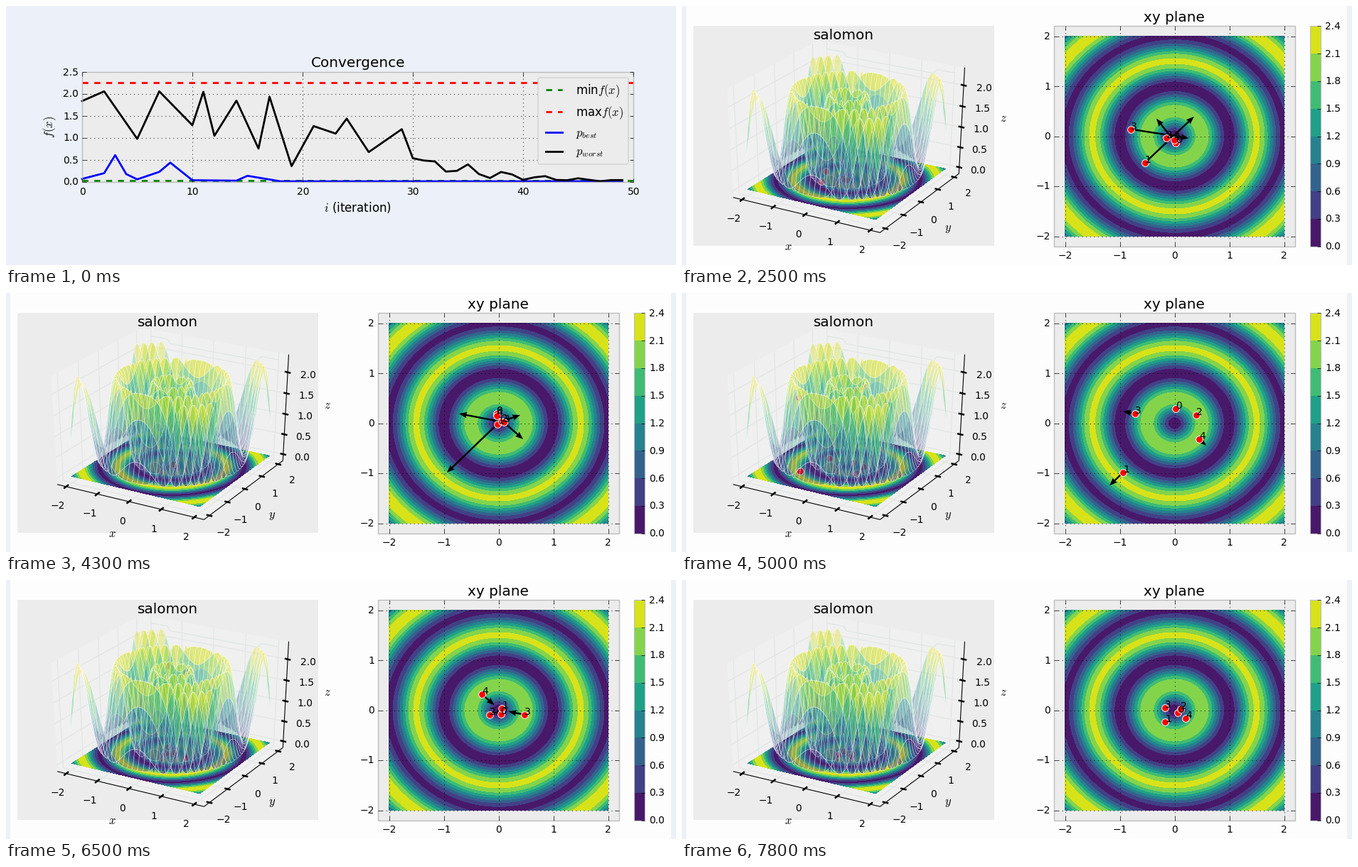
Write a matplotlib script that moves like this. It is 942 by 365 pixels and loops after 8 s.

```python
from itertools import product

import numpy as np
import matplotlib as mpl
import matplotlib.pyplot as plt
from matplotlib.animation import FuncAnimation
from matplotlib.collections import LineCollection, PolyCollection
from matplotlib.patches import FancyBboxPatch, Polygon, Rectangle

mpl.rcParams.update({"font.family": "DejaVu Sans", "mathtext.fontset": "cm"})

W, H, DPI = 942, 365, 100
PAPER, FACE, EDGE = "#ecf0f8", "#ececec", "#bcbcbc"
CMAP = mpl.colormaps["viridis"]
LEVELS = np.arange(9) * 0.3
TICKS = np.arange(-2, 3)

# Start of every swarm step, in tenths of a second
STARTS = np.array([5, 25, 30, 35, 39, 43, 47, 50, 54, 57, 61, 65, 68, 71, 75, 78])

# The swarm swings around the minimum: turning points of each particle (stage pixels)
TURNS = [0, 1, 5, 8, 11, 16]
SWINGS = np.array([
    [(705, 193), (699, 203), (685, 177), (694, 163), (695, 190), (697, 187)],
    [(607, 262), (582, 286), (762, 116), (620, 253), (705, 172), (679, 200)],
    [(709, 176), (688, 183), (670, 190), (723, 172), (671, 193), (701, 182)],
    [(557, 160), (550, 161), (762, 194), (637, 170), (751, 194), (679, 180)],
    [(718, 222), (716, 220), (652, 140), (727, 206), (652, 146), (708, 195)],
], dtype=float)


def swarm(step):
    j = min(int(np.searchsorted(TURNS, step, side="right")) - 1, len(TURNS) - 2)
    t = (step - TURNS[j]) / (TURNS[j + 1] - TURNS[j])
    ease = (1 - np.cos(np.pi * t)) / 2 if j == 3 else np.sin(np.pi * t / 2)
    return SWINGS[:, j] + ease * (SWINGS[:, j + 1] - SWINGS[:, j])


def height(x, y):
    r = np.hypot(x, y)
    return 1 - np.cos(2 * np.pi * r) + 0.1 * r


def through(i, points):
    return np.interp(i, *zip(*points))


def worst(i):
    """Zigzag between a few extremes, then a decaying ripple."""
    zigzag = through(i, [(0, 1.84), (2, 2.06), (5, 0.98), (7, 2.06), (10, 1.29), (11, 2.05),
                         (12, 1.05), (14, 1.85), (16, 0.76), (17, 1.94), (19, 0.36),
                         (21, 1.27), (23, 1.1), (24, 1.44), (26, 0.68), (29, 1.2)])
    j = np.maximum(i - 30, 0)
    ripple = 0.6 * np.minimum(j / 5, 1) * np.cos(2 * np.pi * (j - 5) / 3.4)
    return np.where(i < 30, zigzag, 0.54 * np.exp(-j / 6.5) * (1 + ripple))


def best(i):
    return through(i, [(0, 0.07), (2, 0.2), (3, 0.61), (4, 0.18), (5, 0.06), (7, 0.23),
                       (8, 0.44), (10, 0.04), (14, 0.03), (15, 0.14), (18, 0.015), (49, 0.015)])


# --- pixel canvas helpers -------------------------------------------------
fig = plt.figure(figsize=(W / DPI, H / DPI), dpi=DPI, facecolor=PAPER)


def canvas():
    ax = fig.add_axes([0, 0, 1, 1])
    ax.set_axis_off()
    ax.set_xlim(0, W)
    ax.set_ylim(H, 0)
    ax.set_autoscale_on(False)
    return ax


def box(ax, x0, y0, x1, y1, fc, ec="none", z=0.0, lw=1.0):
    ax.add_patch(Rectangle((x0, y0), x1 - x0, y1 - y0, fc=fc, ec=ec, lw=lw, zorder=z))


def write(ax, x, y, s, size=10, ha="center", va="baseline", zorder=8, **kw):
    return ax.text(x, y, s, size=size, ha=ha, va=va, zorder=zorder, **kw)


def segs(ax, lines, color="black", lw=0.5, z=5, **kw):
    ax.add_collection(LineCollection(lines, colors=color, linewidths=lw, zorder=z, **kw),
                      autolim=False)


def minus(t):
    return str(t).replace("-", "\u2212")


def frame(ax, x0, y0, x1, y1, xs, ys):
    """Spines, dotted grid and inward ticks on all four sides."""
    grid = [[(x, y1), (x, y0)] for x in xs] + [[(x0, y), (x1, y)] for y in ys]
    segs(ax, grid, z=3, linestyles=[(0, (2, 6))])
    box(ax, x0, y0, x1, y1, "none", EDGE, 4)
    t = 5.5
    marks = [[(x, a), (x, a + d)] for x in xs for a, d in ((y0, t), (y1, -t))]
    marks += [[(a, y), (a + d, y)] for y in ys for a, d in ((x0, t), (x1, -t))]
    segs(ax, marks)


# --- convergence chart ----------------------------------------------------
def build_chart(ax):
    x0, y0, x1, y1 = 107, 93, 882, 248
    px = lambda i: x0 + (x1 - x0) * np.asarray(i) / 50
    py = lambda v: y1 - (y1 - y0) * np.asarray(v) / 2.5
    box(ax, x0, y0, x1, y1, FACE)
    xs, ys = np.arange(0, 51, 10), np.arange(6) * 0.5
    frame(ax, x0, y0, x1, y1, px(xs), py(ys))
    for i in xs:
        write(ax, px(i) + 0.5, 266, str(i))
    for v in ys:
        write(ax, 102, py(v) + 4.5, f"{v:.1f}", ha="right")
    write(ax, 494.7, 86, "Convergence", 14.4)
    write(ax, 494.5, 289.5, "$i$ (iteration)", 12)
    write(ax, 62, 170.5, "$f(x)$", 12, rotation=90, va="center")

    dash = (0, (3, 3))
    ends, steps = np.array([0, 50]), np.arange(50)
    curves = [(ends, 0.03 + 0 * ends, "green", dash, "min$f(x)$", 118, 124.5),
              (ends, 2.26 + 0 * ends, "red", dash, "max$f(x)$", 149, 155),
              (steps, best(steps), "blue", "-", "$p_{best}$", 178, 184),
              (steps, worst(steps), "black", "-", "$p_{worst}$", 205, 210)]
    ax.add_patch(FancyBboxPatch((751, 104), 121, 116, boxstyle="round,pad=3", fc=FACE,
                                ec="#d2d2d2", lw=1, zorder=6))
    for n, (xs, ys, color, ls, label, ly, ty) in enumerate(curves):
        style = dict(color=color, lw=2, ls=ls, solid_capstyle="projecting")
        ax.plot(px(xs), py(ys), zorder=3.5 + n / 10, **style)
        ax.plot([758.5, 782], [ly, ly], zorder=7, **style)
        write(ax, 801, ty, label, 12, "left")


# --- 3D view --------------------------------------------------------------
ELEV, AZIM, DIST = np.radians(30), np.radians(-60), 10
MID, SPAN = np.array([0, 0, 1.125]), np.array([4.4, 4.4, 2.475])
L = 2.2 * 25 / 24
LO, HI = MID[2] + np.array([-1, 1]) * SPAN[2] / 2 * 25 / 24

ce, se, ca, sa = np.cos(ELEV), np.sin(ELEV), np.cos(AZIM), np.sin(AZIM)
CAMERA = np.array([(-sa, ca, 0), (-ca * se, -sa * se, ce), (ca * ce, sa * ce, se)])


def project(x, y, z):
    """Perspective view of the unit cube, in stage pixels."""
    p = np.stack(np.broadcast_arrays(x, y, z), -1)
    right, up, near = np.moveaxis((p - MID) / SPAN @ CAMERA.T, -1, 0)
    u, v = right / (DIST - near), up / (DIST - near)
    return 16 + 423 * (u + 0.095) / 0.185, 338.3 - 310 * (v + 0.095) / 0.185


def edge(*pts):
    return [project(*p) for p in pts]


def surface(ax, cells=25, sub=6):
    """Translucent patches with curved outlines, painted back to front."""
    g = np.linspace(-2, 2, cells * sub + 1)
    X, Y = np.meshgrid(g, g)
    Z = height(X, Y)
    P = np.stack([*project(X, Y, Z), Z, 0.5 * X - 0.87 * Y], -1)
    patches = []
    for r, c in product(range(0, cells * sub, sub), repeat=2):
        r1, c1 = r + sub, c + sub
        patches.append(np.concatenate([P[r, c:c1], P[r:r1, c1], P[r1, c1:c:-1], P[r1:r:-1, c]]))
    patches.sort(key=lambda q: q[:, 3].mean())
    colors = CMAP([q[:, 2].mean() / 2.1 for q in patches])
    colors[:, 3] = 0.34
    ax.add_collection(PolyCollection([q[:, :2] for q in patches], facecolors=colors, zorder=2,
                                     edgecolors=(1, 1, 1, 0.5), linewidths=0.45), autolim=False)


def build_view(ax):
    box(ax, 16, 28, 439, 338, FACE)
    walls = [[(-L, -L, LO), (-L, L, LO), (-L, L, HI), (-L, -L, HI)],
             [(-L, L, LO), (L, L, LO), (L, L, HI), (-L, L, HI)],
             [(-L, -L, LO), (L, -L, LO), (L, L, LO), (-L, L, LO)]]
    for wall in walls:
        ax.add_patch(Polygon(edge(*wall), fc="#f0f0f0", ec="none", zorder=0.3))
    zs = np.arange(5) * 0.5
    grid = [edge((t, -L, LO), (t, L, LO), (t, L, HI)) for t in TICKS]
    grid += [edge((L, t, LO), (-L, t, LO), (-L, t, HI)) for t in TICKS]
    grid += [edge((-L, -L, z), (-L, L, z), (L, L, z)) for z in zs]
    segs(ax, grid, "#e4e6e6", 1, 0.5)

    g = np.linspace(-2, 2, 161)
    X, Y = np.meshgrid(g, g)
    ax.contourf(*project(X, Y, 0), height(X, Y), LEVELS, cmap=CMAP, zorder=1)
    crest = height(X, Y).max(axis=0)
    segs(ax, [np.column_stack(project(g, L, crest))], "#dce5e3", 0.8, 0.6)
    surface(ax)

    segs(ax, [edge((-L, -L, LO), (L, -L, LO), (L, L, LO), (L, L, HI))], lw=0.8)
    along_x, along_y = np.array([4.2, 1.0]), np.array([3.4, -2.6])
    marks = [(project(t, -L, LO), along_y) for t in TICKS]
    marks += [(project(L, t, LO), along_x) for t in TICKS]
    marks += [(project(L, L, z), along_x) for z in zs]
    segs(ax, [[np.array(p) - d, np.array(p) + d] for p, d in marks], lw=1.8)
    for t in TICKS:
        write(ax, 163 + 45 * t, 326 + 10.75 * t, minus(t))
        write(ax, 354 + 24 * t, 305.5 - 18.5 * t, minus(t))
    for z in zs:
        write(ax, 416.5 + 4 * z, 235.5 - 57.5 * z, f"{z:.1f}")
    for x, y, s in ((149, 344, "$x$"), (374, 317, "$y$"), (452, 163, "$z$")):
        write(ax, x, y, s, 12)
    write(ax, 227, 47, "salomon", 14.4)


# --- xy plane -------------------------------------------------------------
CX, CY, SX, SY = 692.5, 183.5, 77, 70.5


def build_plane(ax):
    x0, x1, y0, y1 = CX - 2.2 * SX, CX + 2.2 * SX, CY - 2.2 * SY, CY + 2.2 * SY
    box(ax, x0, y0, x1, y1, FACE)
    g = np.linspace(-2, 2, 201)
    X, Y = np.meshgrid(g, g)
    ax.contourf(CX + SX * X, CY - SY * Y, height(X, Y), LEVELS, cmap=CMAP, zorder=1)
    frame(ax, x0, y0, x1, y1, CX + SX * TICKS, CY - SY * TICKS)
    for t in TICKS:
        write(ax, CX + SX * t, 356, minus(t))
        write(ax, 518, CY - SY * t + 4.5, minus(t), ha="right")
    write(ax, CX - 0.5, 21.5, "xy plane", 14.4)

    step = (y1 - y0) / 8
    for i in range(9):
        y = y1 - i * step
        if i < 8:
            box(ax, 883, y - step, 898, y, CMAP((i + 0.5) / 8), z=1)
        write(ax, 904, y + 4.5, f"{LEVELS[i]:.1f}", ha="left")
        segs(ax, [[(892.5, y), (898, y)]])
    box(ax, 883, y0, 898, y1, "none", EDGE, 4, 0.8)


chart, stage = canvas(), canvas()
build_chart(chart)
box(stage, 6, -2, 935, H + 2, "#fdfdfe", z=-1)
build_view(stage)
build_plane(stage)


def dots(color, z):
    return stage.plot([], [], "o", ms=7, mfc=color, mec="white", mew=0.7, zorder=z)[0]


peaks, feet = dots("magenta", 1.5), dots("red", 1.6)
near_peaks, near_feet = dots("magenta", 1.9), dots("red", 2.5)
heads = dots("red", 6.5)
arrows = stage.quiver(*SWINGS[:, 0].T, np.ones(5), np.ones(5), angles="xy", scale_units="xy",
                      scale=1, units="dots", width=2.4, headwidth=3.6, headlength=4.6,
                      headaxislength=4.2, minlength=0.5, zorder=6)
names = [write(stage, 0, 0, str(n), ha="left", zorder=7) for n in range(5)]
stage.set_xlim(0, W)
stage.set_ylim(H, 0)


def update(i):
    step = int((STARTS <= i).sum())
    chart.set_visible(step == 0)
    stage.set_visible(step > 0)
    if step == 0:
        return
    pos = swarm(step)
    heads.set_data(*pos.T)
    arrows.set_offsets(pos)
    arrows.set_UVC(*(pos - swarm(step - 1)).T)
    for label, p in zip(names, pos):
        label.set_position(p)

    x, y = (pos[:, 0] - CX) / SX, (CY - pos[:, 1]) / SY
    top, base = np.array(project(x, y, height(x, y))), np.array(project(x, y, 0))
    outer = np.hypot(x, y) > 2
    peaks.set_data(*top[:, ~outer])
    feet.set_data(*base[:, ~outer])
    near_peaks.set_data(*top[:, outer])
    near_feet.set_data(*base[:, outer])


anim = FuncAnimation(fig, update, frames=80, interval=100, init_func=lambda: None,
                     repeat=True, repeat_delay=0, blit=False)
plt.show()
```
